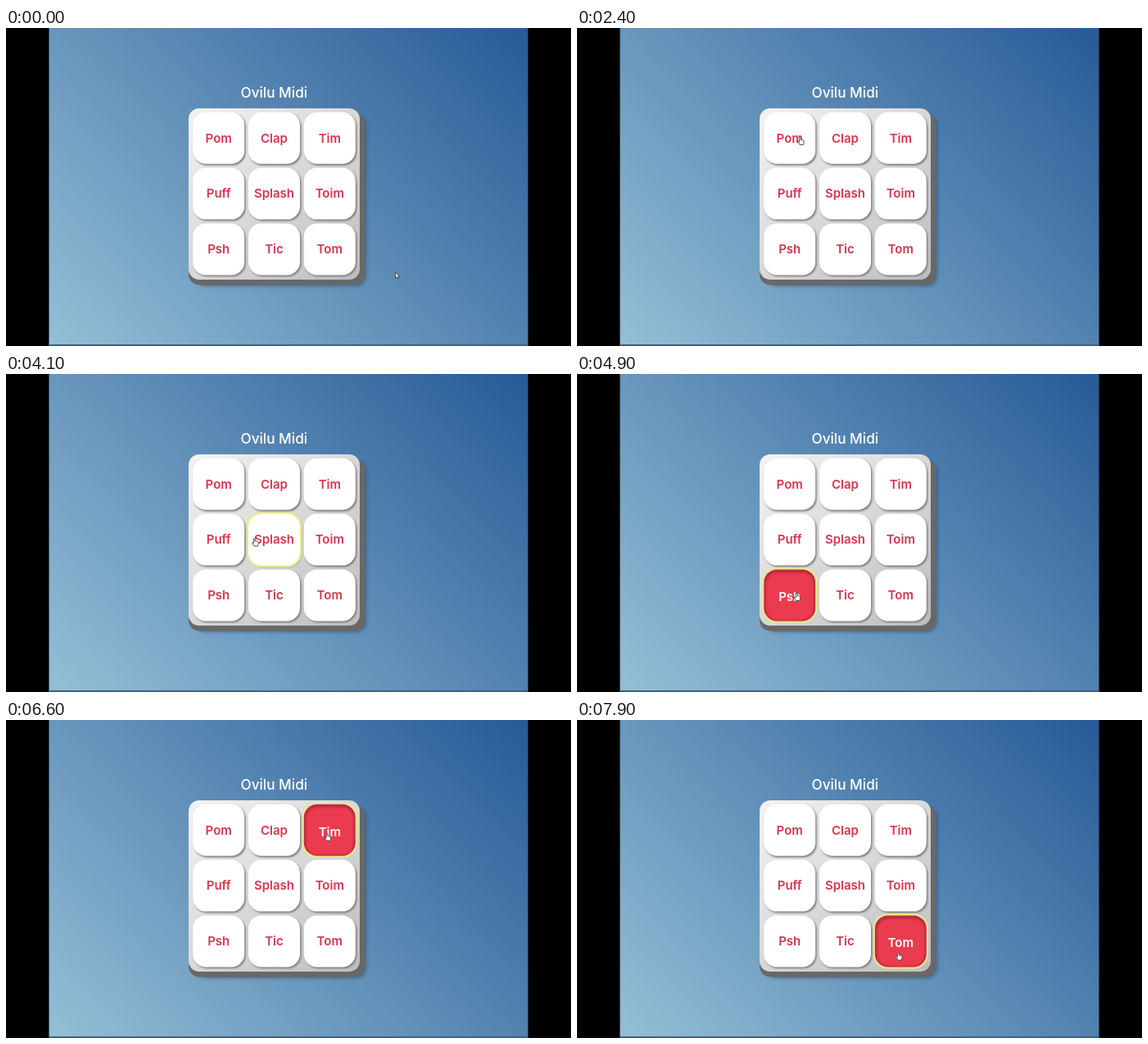
An HTML page for the animation above (8000 ms loop, 690x388 px).

```html
<!DOCTYPE html>
<html lang="en">
<head>
<meta charset="utf-8">
<title>Sound pad</title>
<style>
  html, body { margin: 0; width: 100%; height: 100%; overflow: hidden; background: #000; }
  svg { display: block; width: 100%; height: 100%; }
  text { font-family: Inter, "Open Sans", sans-serif; text-anchor: middle; }
  .title { font-size: 17.2px; font-weight: 500; fill: #fff; }
  .label { font-size: 15px; font-weight: 600; fill: #d5354e; }
  .pressed .label { fill: #fff; transform: translateY(2px); }
  .ring, .red { visibility: hidden; }
  .focus .ring, .pressed .red { visibility: visible; }
  .pressed .shade { visibility: hidden; }
</style>
</head>
<body>
<svg viewBox="0 0 690 388">
  <defs>
    <linearGradient id="sky" gradientUnits="userSpaceOnUse" x1="102" y1="436" x2="587" y2="-50">
      <stop offset="0" stop-color="#94bfd6"/>
      <stop offset="1" stop-color="#275a97"/>
    </linearGradient>
    <linearGradient id="metal" x1="0" y1="0" x2="1" y2="1">
      <stop offset="0" stop-color="#f3f3f3"/>
      <stop offset="1" stop-color="#bdbdbd"/>
    </linearGradient>
    <filter id="soft" x="-20%" y="-20%" width="140%" height="140%"><feGaussianBlur stdDeviation="1"/></filter>
    <filter id="wide" x="-20%" y="-20%" width="140%" height="140%"><feGaussianBlur stdDeviation="2"/></filter>
  </defs>
  <rect width="690" height="388"/>
  <rect x="52.5" width="585" height="388" fill="url(#sky)"/>
  <rect x="52.5" y="386" width="585" height="2" fill="#435f80"/>
  <text class="title" x="327.3" y="85">Ovilu Midi</text>
  <g id="panel"></g>
  <g id="keys"></g>
  <g id="cursor" stroke="#3b3b40" stroke-width=".9" stroke-linejoin="round" fill="#fff">
    <path id="arrow" d="M-1-4V3.2L.7 1.8 1.8 4.2 3 3.6 2 1.4H4Z"/>
    <path id="hand" d="M-1.9-4.2Q-1-5.2-.2-4.2V-1.1Q.7-1.6 1.2-.8 2-1.2 2.5-.4 3.6-.6 3.7.5V2.6L2.8 5H-1.3L-3.8 1.5Q-4 .3-2.9.7L-1.9 1.6Z"/>
  </g>
</svg>
<script>
const LOOP = 8000;
const SIZE = 63, PITCH = 67.8, LEFT = 228.2, TOP = 102.8;
const NAMES = ["Pom", "Clap", "Tim", "Puff", "Splash", "Toim", "Psh", "Tic", "Tom"];

// key name, press time, release time
const PRESSES = [
  ["Pom", 2500, 2700], ["Clap", 3080, 3280], ["Splash", 3780, 3980],
  ["Puff", 4280, 4480], ["Psh", 4850, 5050], ["Tic", 5380, 5580],
  ["Splash", 5980, 6180], ["Tim", 6550, 6780], ["Toim", 7180, 7380], ["Tom", 7880, LOOP]
];

// departure time, arrival time, place reached
const MOVES = [
  [0, 0, 476.5, 302], [1800, 2400, 273.5, 137.5], [2620, 3020, 333, 139],
  [3320, 3750, 329, 205], [3980, 4250, 271, 205], [4480, 4800, 269, 271.5],
  [5050, 5360, 315, 279], [5600, 5960, 333, 209], [6190, 6520, 393, 142.5],
  [6800, 7150, 394, 210], [7390, 7840, 393.3, 288]
];

const byId = id => document.getElementById(id);

function add(parent, tag, attrs, text = "") {
  const node = document.createElementNS("http://www.w3.org/2000/svg", tag);
  for (const name in attrs) node.setAttribute(name, attrs[name]);
  node.textContent = text;
  parent.append(node);
  return node;
}

function box(parent, x, y, size, rx, fill, more = {}) {
  return add(parent, "rect", { x, y, width: size, height: size, rx, fill, ...more });
}

function buildPanel() {
  const panel = byId("panel");
  box(panel, 231, 106, 209, 13, "#20364f", { opacity: .45, filter: "url(#wide)" });
  for (let d = 6.5; d > 0; d -= .5) box(panel, 223 + d, 98 + d, 209, 13, "#686868");
  box(panel, 223, 104.5, 209, 13, "#686868");
  box(panel, 223, 98, 209, 13, "url(#metal)");
}

function buildKey(name, i) {
  const x = LEFT + i % 3 * PITCH, y = TOP + Math.floor(i / 3) * PITCH;
  const key = add(byId("keys"), "g", {});
  box(key, x + 1.4, y + 1.6, SIZE, 16, "#777", { class: "shade", filter: "url(#soft)" });
  box(key, x - .6, y - .6, SIZE + 1.2, 16.5, "none", { class: "ring", stroke: "#e9ec83", "stroke-width": 3 });
  box(key, x, y, SIZE, 16, "#fff");
  box(key, x, y, SIZE, 16, "#be2b40", { class: "red" });
  box(key, x + 2.8, y + 4, SIZE - 5.2, 14, "#eb3a50", { class: "red", filter: "url(#soft)" });
  add(key, "text", { class: "label", x: x + SIZE / 2, y: y + SIZE / 2 + 5.2 }, name);
  return key;
}

function cursorAt(t) {
  const n = MOVES.findLastIndex(move => move[0] <= t);
  const [start, end, x, y] = MOVES[n];
  const [, , fromX, fromY] = MOVES[Math.max(0, n - 1)];
  const p = end > start ? Math.min(1, (t - start) / (end - start)) : 1;
  const ease = p * p * (3 - 2 * p);
  return [fromX + (x - fromX) * ease, fromY + (y - fromY) * ease];
}

function overKey(x, y) {
  const inside = v => v >= 0 && v < 3 * PITCH && v % PITCH < SIZE;
  return inside(x - LEFT) && inside(y - TOP);
}

buildPanel();
const keys = NAMES.map(buildKey);

function draw(t) {
  const last = PRESSES.findLast(press => press[1] <= t);
  keys.forEach((key, i) => {
    const focused = !!last && last[0] === NAMES[i];
    key.classList.toggle("focus", focused);
    key.classList.toggle("pressed", focused && t < last[2]);
  });
  const [x, y] = cursorAt(t);
  const pointing = overKey(x - 1, y - 4);
  byId("cursor").setAttribute("transform", `translate(${x} ${y})`);
  byId("hand").setAttribute("visibility", pointing ? "visible" : "hidden");
  byId("arrow").setAttribute("visibility", pointing ? "hidden" : "visible");
}

const began = performance.now();
function tick() {
  draw((performance.now() - began) % LOOP);
  requestAnimationFrame(tick);
}
tick();
</script>
</body>
</html>
```
